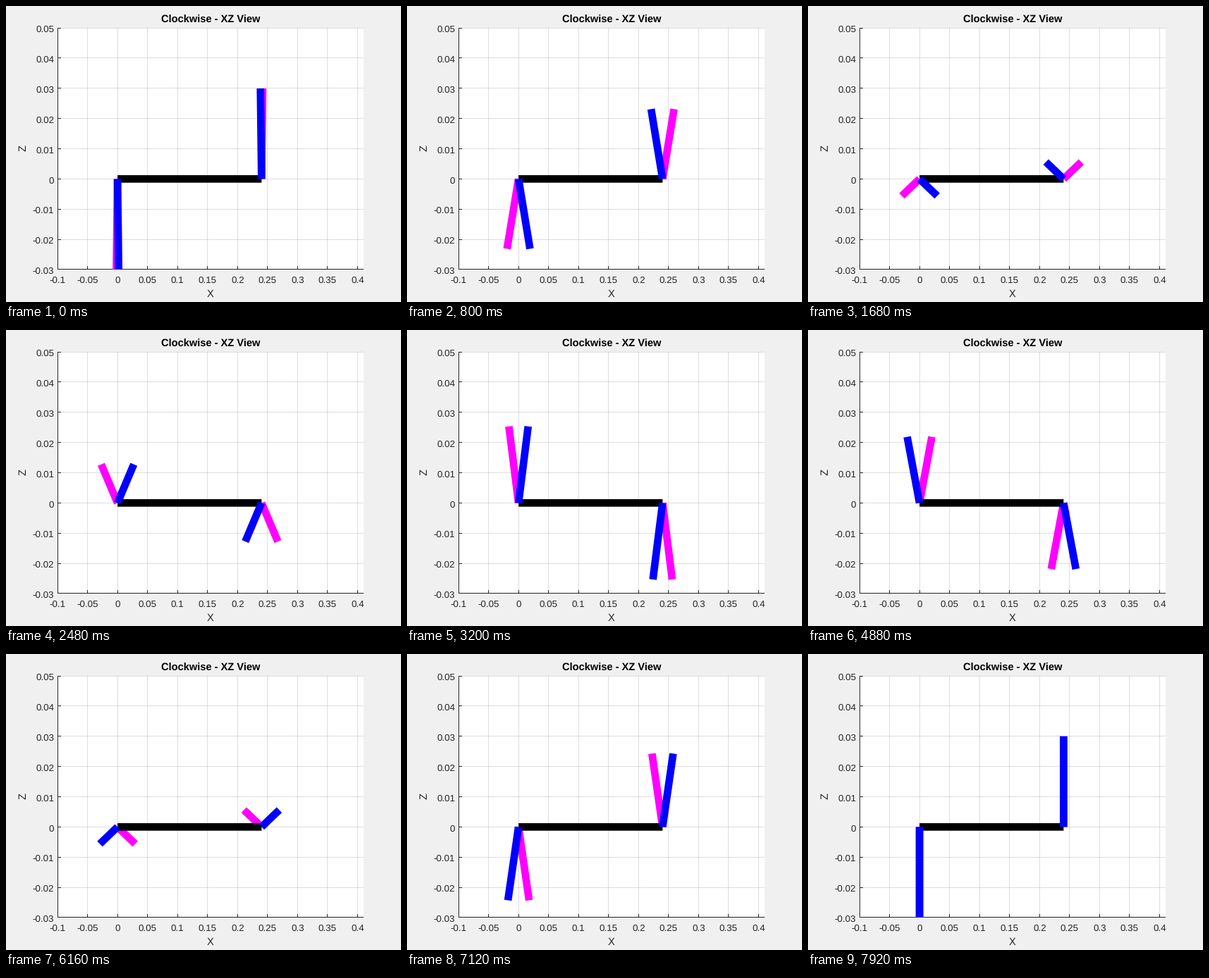
A matplotlib script that plays this animation: 560x420 px, repeating every 8 s.

```python
from math import cos, floor, pi, sin

import matplotlib.pyplot as plt
from matplotlib.animation import FuncAnimation
from matplotlib.patches import Rectangle

W, H, DPI = 560, 420, 80
FRAMES, INTERVAL = 100, 80
PT = 72 / DPI                                  # points per pixel
LEFT, RIGHT, TOP, BOTTOM = 73, 507, 31, 374    # plot box in pixels
X_LIM, Z_LIM = (-0.1, 0.41), (-0.03, 0.05)
INK = "#262626"
LEG, BODY = 0.03, 0.24
SMALL, BIG = 40 / 3, 44 / 3                    # text sizes in pixels

plt.rcParams["font.family"] = "Liberation Sans"
plt.rcParams["text.hinting"] = "no_hinting"

# One axes over the whole figure, measured in pixels from the top left.
fig = plt.figure(figsize=(W / DPI, H / DPI), dpi=DPI, facecolor="#f0f0f0")
ax = fig.add_axes([0, 0, 1, 1], xlim=(0, W), ylim=(H, 0))
ax.axis("off")
box = ax.add_patch(Rectangle((LEFT, TOP), RIGHT - LEFT, BOTTOM - TOP, color="white",
                             linewidth=0, zorder=0))


def px(x):
    return LEFT + (x - X_LIM[0]) / (X_LIM[1] - X_LIM[0]) * (RIGHT - LEFT)


def py(z):
    return BOTTOM - (z - Z_LIM[0]) / (Z_LIM[1] - Z_LIM[0]) * (BOTTOM - TOP)


def rule(xs, ys, alpha=1.0):
    """Draw a one pixel wide straight line."""
    ax.plot(xs, ys, color=INK, alpha=alpha, linewidth=PT, zorder=1,
            solid_capstyle="butt", snap=False)


def label(x, y, text, size=SMALL, color=INK, ha="center", **kw):
    """Place text with its baseline at pixel (x, y)."""
    ax.text(x, y, text, fontsize=size * PT, color=color, ha=ha, va="baseline",
            rotation_mode="anchor", **kw)


for k in range(-10, 41, 5):
    x = px(k / 100)
    mid = floor(x) + 0.5
    rule([mid, mid], [TOP, BOTTOM], 0.15)
    rule([mid, mid], [BOTTOM - 5, BOTTOM])
    label(x, 393, f"{k / 100:g}")
for k in range(-3, 6):
    y = py(k / 100)
    mid = min(floor(y), BOTTOM - 1) + 0.5
    rule([LEFT, RIGHT], [mid, mid], 0.15)
    rule([LEFT, LEFT + 5], [mid, mid])
    label(68.3, y + 6, f"{k / 100:g}", ha="right")
rule([LEFT + 0.5] * 2, [TOP, BOTTOM])
rule([LEFT, RIGHT], [BOTTOM - 0.5] * 2)

label(290, 24, "Clockwise - XZ View", BIG, "black", weight="bold")
label(290, 413, "X", BIG)
label(29, 201.5, "Z", BIG, rotation=90)


def bar(color, z):
    line, = ax.plot([], [], color=color, linewidth=32 / 3 * PT, zorder=z,
                    solid_capstyle="butt", snap=False)
    line.set_clip_path(box)
    return line


def stretch(line, x, dx, dz):
    """Lay a bar from (x, 0) to (x + dx, dz) in plot units."""
    line.set_data([px(x), px(x + dx)], [py(0), py(dz)])


# Each pair of legs is (left, right); the far pair turns the opposite way.
far = [bar("magenta", 3), bar("magenta", 3)]
body = bar("black", 4)
stretch(body, 0, BODY, 0)
near = [bar("blue", 5), bar("blue", 5)]


def update(i):
    angle = 2 * pi * (i + 1) / FRAMES
    for (left, right), turn in ((far, -1), (near, 1)):
        dx, dz = turn * LEG * sin(angle), -LEG * cos(angle)
        stretch(left, 0, dx, dz)
        stretch(right, BODY, -dx, -dz)
    return far + near


anim = FuncAnimation(fig, update, frames=FRAMES, interval=INTERVAL,
                     repeat=True, repeat_delay=0)
plt.show()
```
